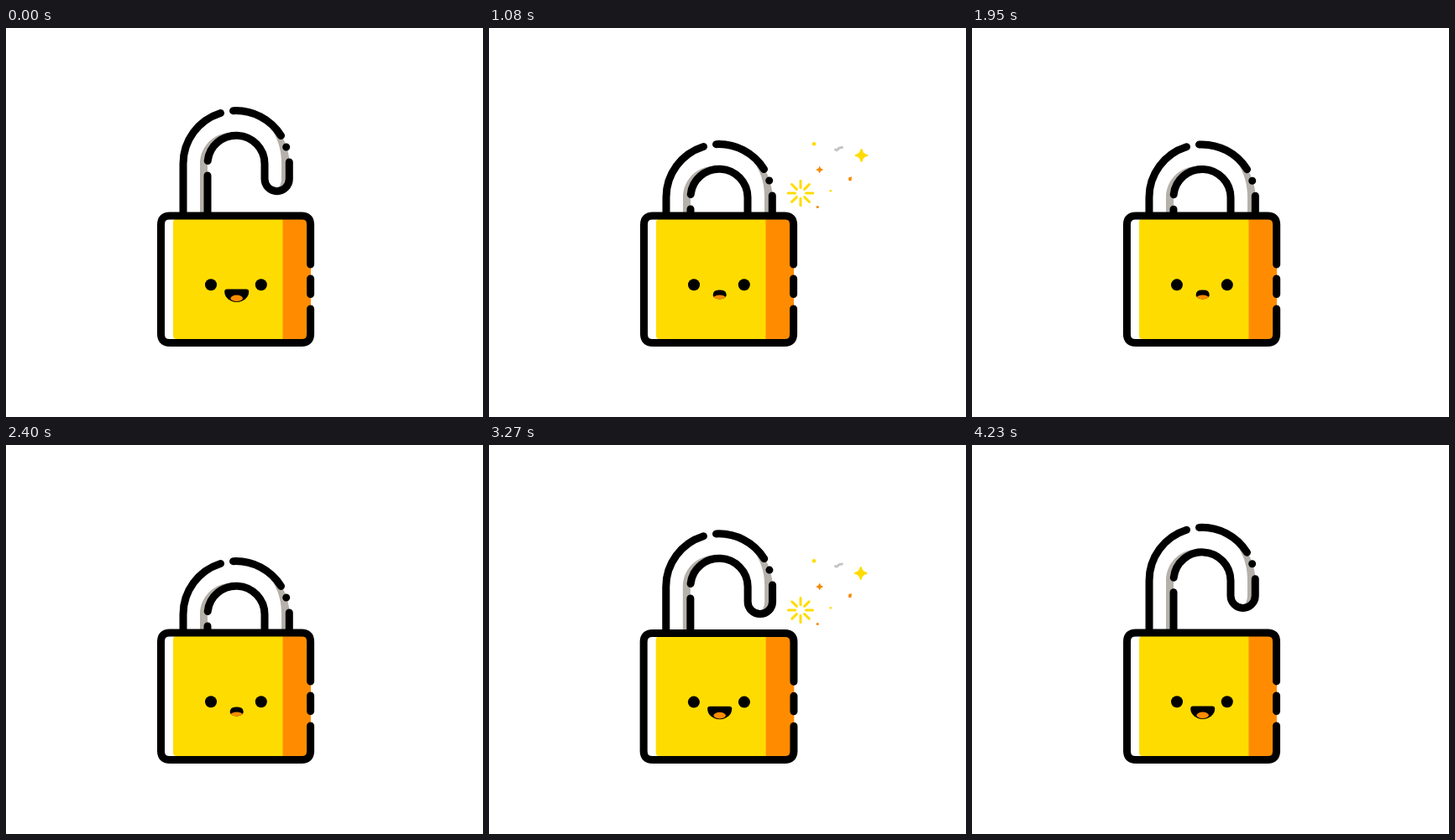
Recreate the animation shown at these times as an HTML page. Size 568 by 464 pixels, loop 4.26 s.

```html
<!DOCTYPE html>
<html lang="en">
<head>
<meta charset="utf-8">
<title>Padlock</title>
<style>
  html, body { margin: 0; width: 100%; height: 100%; overflow: hidden; background: #fff; }
  svg { display: block; width: 568px; height: 464px; }
  .line { fill: none; stroke: #000; stroke-width: 9; stroke-linecap: round; stroke-linejoin: round; }
  .shade { fill: #b5b1aa; }
  .yellow { fill: #ffdc00; }
  .orange { fill: #ff8c00; }
  #rays { fill: none; stroke: #ffdc00; stroke-linecap: round; }
  #bits path { stroke-linecap: round; stroke-linejoin: round; }
</style>
</head>
<body>
<svg viewBox="0 0 568 464">
  <defs><clipPath id="mouthClip"><path id="mouthCut"/></clipPath></defs>
  <g id="lock">
    <g id="shackle">
      <path class="shade" d="M231 290V162C231 143 245 127 264 125L274 128A34 34 0 0 0 240 162V290Z"/>
      <path class="shade" d="M298 103A63.5 63.5 0 0 1 337.5 162V180A14.5 14.5 0 0 1 322 194.5C326 190 328 185 328 180V160C328 138 318 116 298 103Z"/>
      <path class="line" d="M211 290V162A63.3 63.3 0 0 1 255.5 101.500M270.500 98.700A63.300 63.300 0 0 1 327.500 128.500M333.700 142h.01M337.300 160V180A14.650 14.650 0 0 1 308 180V162A34 34 0 0 0 240.200 158.500M240 176V290"/>
    </g>
    <rect x="184" y="223" width="179" height="153" rx="11" fill="#fff"/>
    <rect class="yellow" x="199" y="228" width="140" height="143" rx="4"/>
    <path class="orange" d="M329.5 228H363V371H329.5Z"/>
    <path class="line" d="M362.600 282V234.500Q362.600 224 352 224H195Q184.500 224 184.500 234.500V365Q184.500 375.500 195 375.500H352Q362.600 375.500 362.600 365V335M362.600 299V317.500"/>
    <ellipse class="eye" cx="244" cy="306.300" rx="7"/>
    <ellipse class="eye" cx="303.800" cy="306.300" rx="7"/>
    <path id="mouth"/>
    <g clip-path="url(#mouthClip)"><ellipse id="tongue" class="orange" cx="274.700" rx="7.200"/></g>
  </g>
  <g id="burst">
    <path id="rays"/>
    <g id="bits"></g>
  </g>
</svg>
<script>
const LOOP = 4260, STEP = 30;
const CLOSE = 330, OPEN = 2460;   // start of each shackle move
const TRAVEL = 40, MOVE = 480;    // distance and time until the stop
const BURST_DELAY = [320, 430], BURST_LEN = 1180;

const $ = id => document.getElementById(id);
const set = (el, attrs) => { for (const k in attrs) el.setAttribute(k, attrs[k]); };
const lerp = (a, b, k) => a + (b - a) * k;

function ramp(t, from, to) {
  const u = Math.min(1, Math.max(0, (t - from) / (to - from)));
  return u * u * (3 - 2 * u);
}

// Damped swing that starts at age 0.
const swing = age => age < 0 ? 0 : Math.exp(-age / 250) * Math.sin(age * Math.PI / 270);

// Accelerate to the stop, then bounce around it.
function travel(age, bounce) {
  if (age < 0) return 0;
  return TRAVEL * Math.min(1, age / MOVE) ** 3.5 + bounce * swing(age - MOVE);
}

const drop = t => travel(t - CLOSE, 18) - travel(t - OPEN, 36);
const stretch = t => 1 + 0.09 * swing(t - CLOSE - MOVE) - 0.1 * swing(t - OPEN - MOVE - 50);
const blink = (t, mid) => Math.max(0.04, Math.min(1, Math.abs(t - mid) / 100));
const joy = t => 1 - ramp(t, 800, 980) + ramp(t, 2930, 3130);

// From a small glum dome (k = 0) to a wide smile (k = 1).
function drawMouth(k) {
  const w = lerp(8, 14.5, k), top = lerp(312.5, 311.5, k), bottom = lerp(323.5, 327, k);
  const cx = 274.7, left = cx - w, right = cx + w;
  const rx = lerp(7, 3, k), ry = lerp(6, 3, k), side = top + ry;
  const d = `M${left} ${side}Q${left} ${top} ${left + rx} ${top}H${right - rx}` +
    `Q${right} ${top} ${right} ${side}A${w} ${bottom - side} 0 0 1 ${left} ${side}Z`;
  set($('mouth'), { d });
  set($('mouthCut'), { d });
  set($('tongue'), { cy: lerp(321.5, 322.4, k), ry: lerp(3, 3.8, k) });
}

const YELLOW = '#ffdc00', ORANGE = '#f58a00';
const STAR = 'M0-6.500Q.800-.800 6.500 0Q.800.800 0 6.500Q-.800.800-6.500 0Q-.800-.800 0-6.500Z';
const CHIP = 'M-1.500-2L2-2.500L1.500 2L-1 2.500L-2 1Z';
const DOT = 'M-2.300 0A2.300 2.300 0 1 1 2.300 0A2.300 2.300 0 1 1-2.300 0Z';
const CURL = 'M-4 1Q-2.500 2.500-1 .5T4-1.500';

// Each bit grows, drifts from one point to another, and shrinks.
const bit = (shape, color, from, to, grow, fade, scale = 1, turn = 0) =>
  ({ shape, color, from, to, grow, fade, scale, turn });
const bits = [
  bit(STAR, YELLOW, [425.5, 173.5], [443.5, 152], [-60, 400], [750, 1180], 1, -40),
  bit(CHIP, ORANGE, [428, 174.5], [430, 180], [30, 380], [650, 1000]),
  bit(STAR, ORANGE, [393.7, 169], [393.7, 169], [30, 380], [650, 1000], 0.5),
  bit(DOT, YELLOW, [387, 138.3], [387, 138.3], [110, 400], [800, 1060]),
  bit(DOT, YELLOW, [406.8, 194.3], [406.8, 194.3], [110, 400], [800, 1060], 0.6),
  bit(DOT, ORANGE, [391.2, 213.5], [391.2, 213.5], [30, 380], [650, 1000], 0.7),
  bit(CURL, '#c4c4c4', [414, 132], [416.5, 144], [40, 400], [700, 1000], 1, -60)
];
for (const b of bits) {
  b.el = document.createElementNS('http://www.w3.org/2000/svg', 'path');
  const curl = b.shape === CURL;
  set(b.el, {
    d: b.shape, stroke: b.color, fill: curl ? 'none' : b.color,
    'stroke-width': curl ? 3 : b.shape === STAR ? 2.6 : 0
  });
  $('bits').append(b.el);
}

function drawBurst(age) {
  const inner = 6.5 + 8.3 * ramp(age, 400, 1000), outer = 7 + 7.8 * ramp(age, 60, 420);
  let d = '';
  for (let i = 0; i < 8; i++) {
    const c = Math.cos(i * Math.PI / 4), s = Math.sin(i * Math.PI / 4);
    d += `M${371 + c * inner} ${197 + s * inner}L${371 + c * outer} ${197 + s * outer}`;
  }
  set($('rays'), { d, 'stroke-width': 3 * ramp(age, 0, 80) * (1 - ramp(age, 800, 1050)) });

  const drift = ramp(age, 100, 420);
  for (const b of bits) {
    const fade = ramp(age, ...b.fade), size = b.scale * ramp(age, ...b.grow) * (1 - fade);
    const x = lerp(b.from[0], b.to[0], drift), y = lerp(b.from[1], b.to[1], drift);
    const turn = b.turn * ramp(age, 680, 1000);
    set(b.el, { transform: `translate(${x} ${y}) rotate(${turn}) scale(${size})` });
  }
}

const eyes = document.querySelectorAll('.eye');

function draw(t) {
  const sx = stretch(t), lid = blink(t, 870) * blink(t, 3000);
  set($('lock'), { transform: `translate(273.5 380) scale(${sx} ${2 - sx}) translate(-273.5 -380)` });
  set($('shackle'), { transform: `translate(0 ${drop(t)})` });
  for (const eye of eyes) set(eye, { ry: 7 * lid });
  drawMouth(joy(t));

  const age = t < OPEN ? t - CLOSE - BURST_DELAY[0] : t - OPEN - BURST_DELAY[1];
  const active = age >= 0 && age < BURST_LEN;
  $('burst').style.display = active ? '' : 'none';
  if (active) drawBurst(age);
}

const begin = performance.now();
function tick() {
  const t = (performance.now() - begin) % LOOP;
  draw(Math.floor(t / STEP) * STEP);
  requestAnimationFrame(tick);
}
tick();
</script>
</body>
</html>
```
